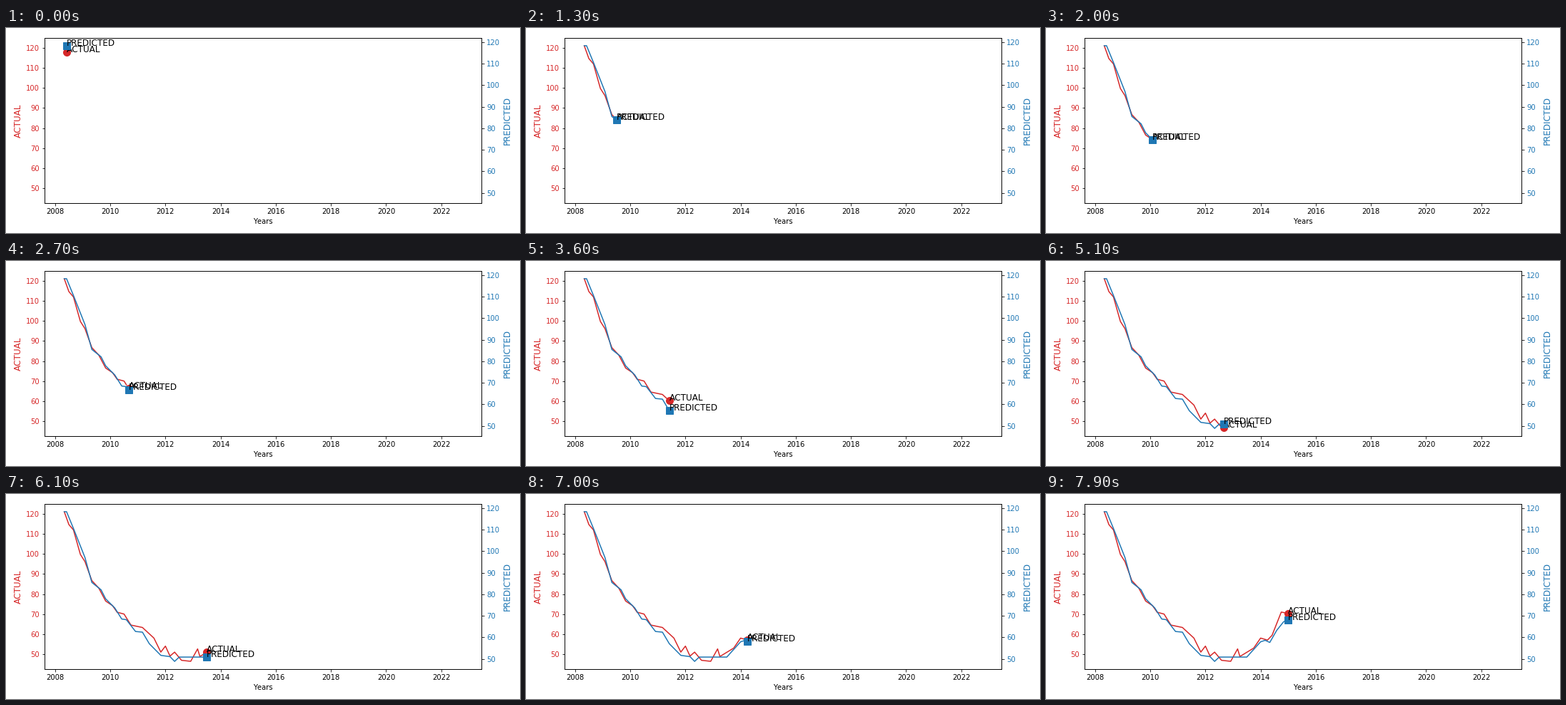
Recreate the animation shown at these times as a matplotlib script. Size 720 by 288 pixels, loop 8000 ms.

```python
import matplotlib.pyplot as plt
import numpy as np
from matplotlib.animation import FuncAnimation

W, H, DPI = 720, 288, 72
FRAMES, INTERVAL = 80, 100
BOX = (53.9, 14.4, 665.9, 245.6)  # left, top, right, bottom in pixels

# Turning points, {months since May 2008: value}
ACTUAL = {
    0: 121.1, 2: 114.7, 4: 112, 7: 99.8, 9: 96.2, 12: 86.7, 15: 83, 18: 76.5,
    21: 74.2, 23: 70.9, 26: 70, 29: 64.5, 34: 63.3, 39: 58, 42: 51, 44: 54,
    46: 49, 48: 51, 51: 46.9, 55: 46.4, 58: 52.6, 59: 48.8, 65: 53, 68: 58,
    71: 57, 73: 59.4, 77: 71, 80: 70.3,
}
PREDICTED = {
    1: 118.4, 4: 110.6, 9: 97.1, 12: 85.5, 16: 82.1, 18: 77.9, 22: 73.6,
    25: 68.5, 27: 68.2, 31: 62.7, 34: 62.4, 37: 57, 42: 51.6, 46: 51,
    48: 48.8, 50: 50.8, 62: 50.8, 68: 57.9, 70: 58.6, 72: 57.6, 75: 63.2,
    78: 67.2, 80: 68.2,
}
months = np.arange(FRAMES + 1)
years = 2008 + (4 + months) / 12

plt.rcParams["text.kerning_factor"] = 6
fig = plt.figure(figsize=(W / DPI, H / DPI), dpi=DPI, facecolor="white")
left, top, right, bottom = BOX
ax = fig.add_axes([left / W, 1 - bottom / H, (right - left) / W, (bottom - top) / H])
ax.set_xlim(2007.616, 2023.454)
ax.set_xticks(range(2008, 2023, 2))
ax.set_xlabel("Years", fontsize=10)
twin = ax.twinx()


class Series:
    """A growing line with a labelled marker one month ahead of it."""

    def __init__(self, axes, name, turns, color, marker, ylim):
        self.values = np.interp(months, list(turns), list(turns.values()))
        axes.set_ylim(*ylim)
        axes.set_yticks(range(50, 121, 10))
        axes.set_ylabel(name, color=color, fontsize=12)
        axes.tick_params(axis="y", labelcolor=color)
        self.line, = axes.plot([], [], color=color, lw=1.5)
        self.head, = axes.plot([], [], marker, color=color, ms=10, mew=1)
        self.label = axes.text(years[0], self.values[0], name, fontsize=12)

    def update(self, i):
        x, y = years[i + 1], self.values[i + 1]
        self.line.set_data(years[:i + 1], self.values[:i + 1])
        self.head.set_data([x], [y])
        self.label.set_position((x, y))
        return self.line, self.head, self.label


series = [
    Series(ax, "ACTUAL", ACTUAL, "tab:red", "o", (42.65, 124.84)),
    Series(twin, "PREDICTED", PREDICTED, "tab:blue", "s", (45.34, 121.87)),
]


def update(i):
    return [artist for s in series for artist in s.update(i)]


anim = FuncAnimation(fig, update, frames=FRAMES, interval=INTERVAL,
                     repeat=True, repeat_delay=0, blit=False)
plt.show()
```
